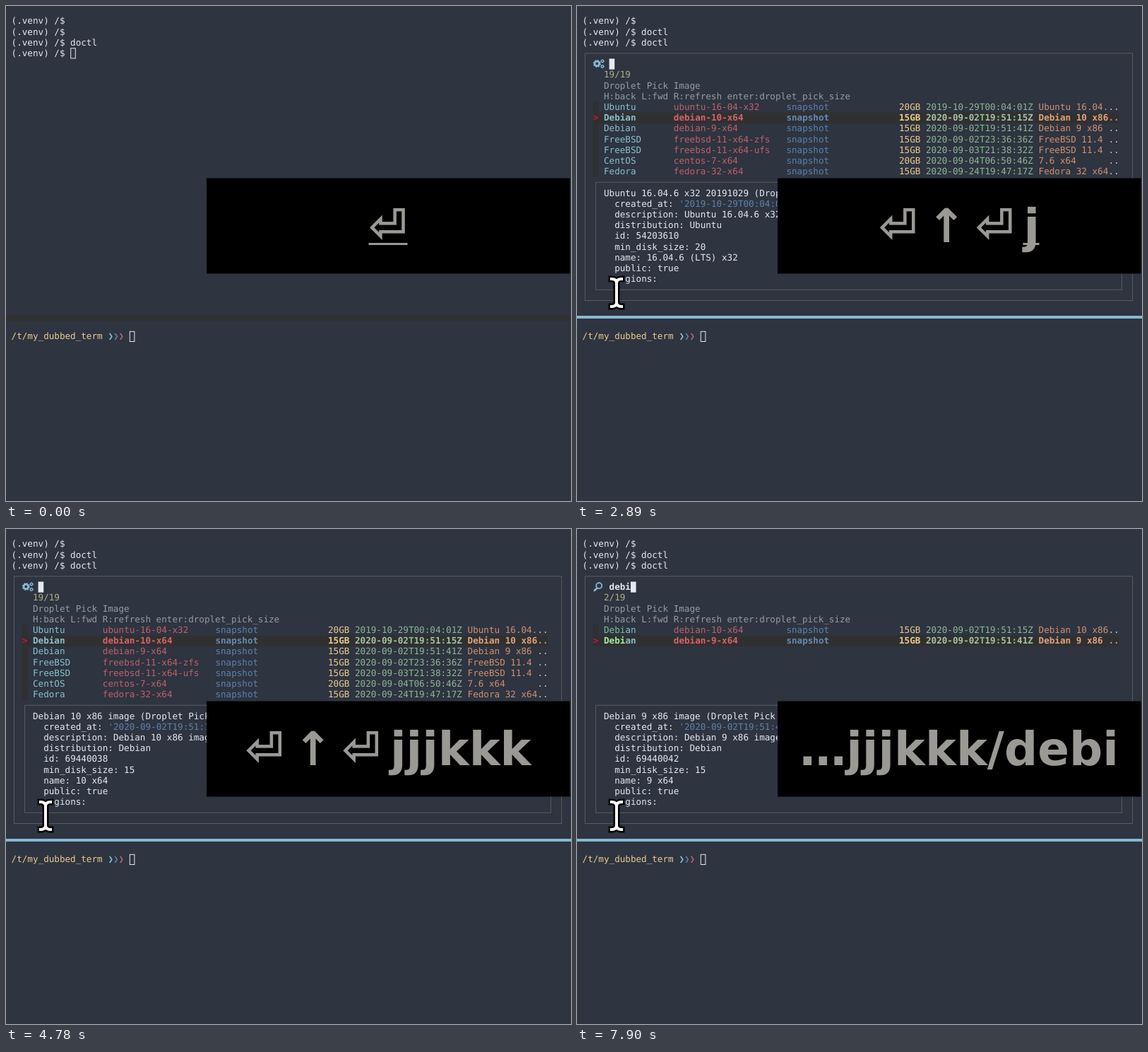
An HTML page that plays this animation: 800 px wide and 700 px high, repeating every 8 s.

```html
<!DOCTYPE html>
<html lang="en">
<head>
<meta charset="utf-8">
<title>Terminal session</title>
<style>
html, body { margin: 0; width: 100%; height: 100%; overflow: hidden; background: #2e3440; }
svg { display: block; width: 800px; height: 700px; }
text { white-space: pre; text-rendering: geometricPrecision; font: 12.624px "DejaVu Sans Mono", monospace; }
text.bold { font-weight: bold; }
text.keys { font: bold 66px "DejaVu Sans", sans-serif; fill: #9a9994; text-anchor: middle; }
</style>
</head>
<body>
<svg id="stage" viewBox="0 0 800 700"></svg>
<script>
const LOOP = 8000;
const CELL = 7.6, LINE = 15.2, TOP = 13.7, LOWER = 459.8;
const C = {
  bg: '#2e3440', fg: '#e5e9f0', sel: '#303030', frame: '#5c5c5a', focus: '#88b8d2',
  cyan: '#88c0d0', red: '#bf616a', blue: '#5e81ac', yellow: '#ebcb8b', orange: '#d0906f',
  date: '#8fb596', mark: '#7cc47f', head: '#929ea6', info: '#afaf87', pointer: '#dd0a45'
};

// label | slug | size | created | shown name | preview title | id | preview name
const IMAGES = [
  'Ubuntu|ubuntu-16-04-x32|20|2019-10-29T00:04:01Z|Ubuntu 16.04.|Ubuntu 16.04.6 x32 20191029|54203610|16.04.6 (LTS) x32',
  'Debian|debian-10-x64|15|2020-09-02T19:51:15Z|Debian 10 x86|Debian 10 x86 image|69440038|10 x64',
  'Debian|debian-9-x64|15|2020-09-02T19:51:41Z|Debian 9 x86|Debian 9 x86 image|69440042|9 x64',
  'FreeBSD|freebsd-11-x64-zfs|15|2020-09-02T23:36:36Z|FreeBSD 11.4|FreeBSD 11.4 ZFS|69452245|11.4 zfs x64',
  'FreeBSD|freebsd-11-x64-ufs|15|2020-09-03T21:38:32Z|FreeBSD 11.4|FreeBSD 11.4 UFS|69452230|11.4 ufs x64',
  'CentOS|centos-7-x64|20|2020-09-04T06:50:46Z|7.6 x64|7.6 x64|69463100|7.6 x64',
  'Fedora|fedora-32-x64|15|2020-09-24T19:47:17Z|Fedora 32 x64|Fedora 32 x64|69457519|32 x64'
].map(row => {
  const [label, slug, size, created, shown, title, id, name] = row.split('|');
  return { label, slug, size, created, shown, title, id, name };
});

// start, keys (a blank is a thin space), end of the underline
const KEYS = [
  [0, '⏎', 100], [1340, '⏎ ↑', 1510], [1860, '⏎ ↑ ⏎', 2030],
  [2890, '⏎ ↑ ⏎ j', 3060], [3150, '⏎ ↑ ⏎ jj', 3320], [3320, '⏎ ↑ ⏎ jjj', 3490],
  [4130, '⏎ ↑ ⏎ jjjk', 4280], [4350, '⏎ ↑ ⏎ jjjkk', 4480], [4640, '⏎ ↑ ⏎ jjjkkk', 4780],
  [6720, '⏎ ↑ ⏎ jjjkkk/', 6880], [7290, '⏎ ↑ ⏎ jjjkkk/d', 7410], [7410, '…⏎ jjjkkk/de', 7620],
  [7620, '…⏎ jjjkkk/deb', 7720], [7720, '…jjjkkk/debi', 7900]
];
const SELECTED = [[0, 0], [2890, 1], [3150, 2], [3320, 3], [4350, 2], [4640, 1]];
const PREVIEW = [[0, -1], [2120, 0], [2970, 1], [3230, 2], [3400, 3], [4420, 2], [4710, 1], [7350, 2]];
const QUERY = [[0, ''], [7290, 'd'], [7410, 'de'], [7620, 'deb'], [7720, 'debi']];
const POINTER = [[540, 12], [580, 6], [620, 2], [660, 0]];
const ADVANCE = { '⏎': 55, '↑': 55, ' ': 13, '…': 66, j: 23, k: 44, '/': 24, d: 47, e: 45, b: 47, i: 23 };

const step = (table, t) => table.filter(s => s[0] <= t).pop();
const value = (table, t) => step(table, t)[1];
const px = col => CELL * (col + 1);
const py = line => TOP + LINE * line;

const rect = (x, y, w, h, fill, extra = '') =>
  `<rect x="${x}" y="${y}" width="${w}" height="${h}" fill="${fill}" ${extra}/>`;

function put(col, top, str, fill = C.fg, bold = false) {
  return `<text x="${px(col)}" y="${top + 11.6}" fill="${fill}" class="${bold ? 'bold' : ''}">${str}</text>`;
}

const write = (col, line, ...rest) => put(col, py(line), ...rest);

function cursor(col, top, solid) {
  return solid
    ? rect(px(col), top, CELL, LINE, C.fg)
    : rect(px(col) + .5, top + .5, CELL - 1, LINE - 1, 'none', `stroke="${C.fg}"`);
}

function frame(col1, line1, col2, line2) {
  const x = px(col1) + CELL / 2, y = py(line1) + LINE / 2;
  return rect(x, y, (col2 - col1) * CELL, (line2 - line1) * LINE, 'none', `stroke="${C.frame}"`);
}

function shell(t) {
  const ps = '(.venv) /$ ';
  const lines = t < 2030 ? ['', '', 'doctl', t < 1340 ? '' : 'doctl'] : ['', 'doctl', 'doctl'];
  let out = lines.map((cmd, i) => write(0, i, ps + cmd)).join('');
  if (t < 1860) out += cursor(t < 1340 ? 11 : 16, py(3), t >= 540);
  else if (t < 2030) out += cursor(0, py(4), true);
  return out;
}

function gear(x, y, r, teeth) {
  const round = 2 * Math.PI * r / (teeth * 2);
  return `<circle cx="${x}" cy="${y}" r="${r * .72}" fill="none" stroke="${C.focus}" stroke-width="${r * .6}"/>` +
    `<circle cx="${x}" cy="${y}" r="${r}" fill="none" stroke="${C.focus}" stroke-width="${r * .4}" stroke-dasharray="${round}"/>`;
}

function icon(searching) {
  if (!searching) return gear(28.3, 81.5, 4.6, 8) + gear(36, 78, 2.3, 6) + gear(36, 85.5, 2.3, 6);
  return `<g fill="none" stroke="${C.focus}" stroke-linecap="round">
    <circle cx="31.2" cy="80.2" r="4" stroke-width="1.8"/>
    <path d="M28 83.8L24.8 87" stroke-width="2.6"/></g>`;
}

function listRow(img, line, on, query) {
  const pale = (normal, strong) => on ? strong : normal;
  const at = img.label.toLowerCase().indexOf(query);
  const end = at + query.length;
  let out = on ? rect(px(2), py(line), 98 * CELL, LINE, C.sel) + write(2, line, '>', C.pointer, true) : rect(px(2), py(line), CELL, LINE, C.sel);
  const cell = (col, str, fill) => { out += write(col, line, str, fill, on); };
  cell(4, img.label.slice(0, at), C.cyan);
  cell(4 + at, img.label.slice(at, end), pale('#7fbf8f', '#a0f0a0'));
  cell(4 + end, img.label.slice(end), C.cyan);
  cell(17, img.slug, pale(C.red, '#d9606b'));
  cell(38, 'snapshot', pale(C.blue, '#648ab8'));
  cell(59, img.size + 'GB', C.yellow);
  const stamp = img.created.replace(/[T:]/g, c => `<tspan fill="${C.mark}">${c}</tspan>`);
  cell(64, stamp, pale(C.date, '#a6c1a6'));
  cell(85, img.shown, pale(C.orange, '#e0a27c'));
  cell(98, '..', pale('#d8c8bd', '#a8968a'));
  return out;
}

function preview(img) {
  const lines = [
    `description: ${img.title}`, `distribution: ${img.label}`, `id: ${img.id}`,
    `min_disk_size: ${img.size}`, `name: ${img.name}`, 'public: true', 'regions:'
  ];
  return write(4, 16, img.title + ' (Droplet Pick Image)') +
    write(6, 17, 'created_at: ') + write(18, 17, `'${img.created}'`, C.blue) +
    lines.map((s, i) => write(6, 18 + i, s)).join('');
}

function picker(t) {
  const query = value(QUERY, t);
  const rows = IMAGES.filter(img => img.label.toLowerCase().includes(query));
  const selected = value(SELECTED, t), shown = value(PREVIEW, t);
  return frame(0, 3, 102, 26) + frame(2, 15, 100, 25) + icon(t >= 6720) +
    write(5, 4, query, C.fg, true) + cursor(5 + query.length, py(4), true) +
    write(4, 5, `${query ? rows.length : 19}/19`, C.info) +
    write(4, 6, 'Droplet Pick Image', C.head) +
    write(4, 7, 'H:back L:fwd R:refresh enter:droplet_pick_size', C.head) +
    rows.map((img, i) => listRow(img, 8 + i, i === selected, query)).join('') +
    (shown < 0 ? '' : preview(IMAGES[shown]));
}

function lowerPane(t) {
  const bar = t < 540 ? rect(0, 437, 800, 9, '#303133') : rect(0, 438, 800, 4, C.focus);
  return bar + put(0, LOWER, '/t/my_dubbed_term', C.yellow) +
    [C.cyan, C.blue, C.red].map((fill, i) => put(18 + i, LOWER, '❯', fill)).join('') +
    cursor(22, LOWER, false);
}

function keyPanel(t) {
  const [, keys, until] = step(KEYS, t);
  const width = [...keys].reduce((sum, k) => sum + ADVANCE[k], 0);
  const last = ADVANCE[keys.at(-1)];
  return rect(284, 243.5, 514.5, 135, '#000') +
    `<text class="keys" x="541" y="334">${keys.replace(/ /g, '\u2009')}</text>` +
    (t < until ? rect(541 + width / 2 - last, 335, last, 3, '#9a9994') : '');
}

function mouse(t) {
  if (t < 540) return '';
  const d = 'M49 386Q56 386 56 392Q56 386 63 386M56 391V420M49 425Q56 425 56 419Q56 425 63 425';
  const line = (color, width) => `<path d="${d}" stroke="${color}" stroke-width="${width}"/>`;
  return `<g transform="translate(0 ${value(POINTER, t)})" fill="none" stroke-linecap="square" stroke-linejoin="round">` +
    line('#000', 9) + line('#fff', 4) + '</g>';
}

const stage = document.getElementById('stage');
let last = '';

function draw() {
  const t = performance.now() % LOOP;
  const scene = rect(0, 0, 800, 700, C.bg) + shell(t) + (t < 2030 ? '' : picker(t)) +
    lowerPane(t) + keyPanel(t) + mouse(t);
  if (scene !== last) stage.innerHTML = last = scene;
  requestAnimationFrame(draw);
}
draw();
</script>
</body>
</html>
```
